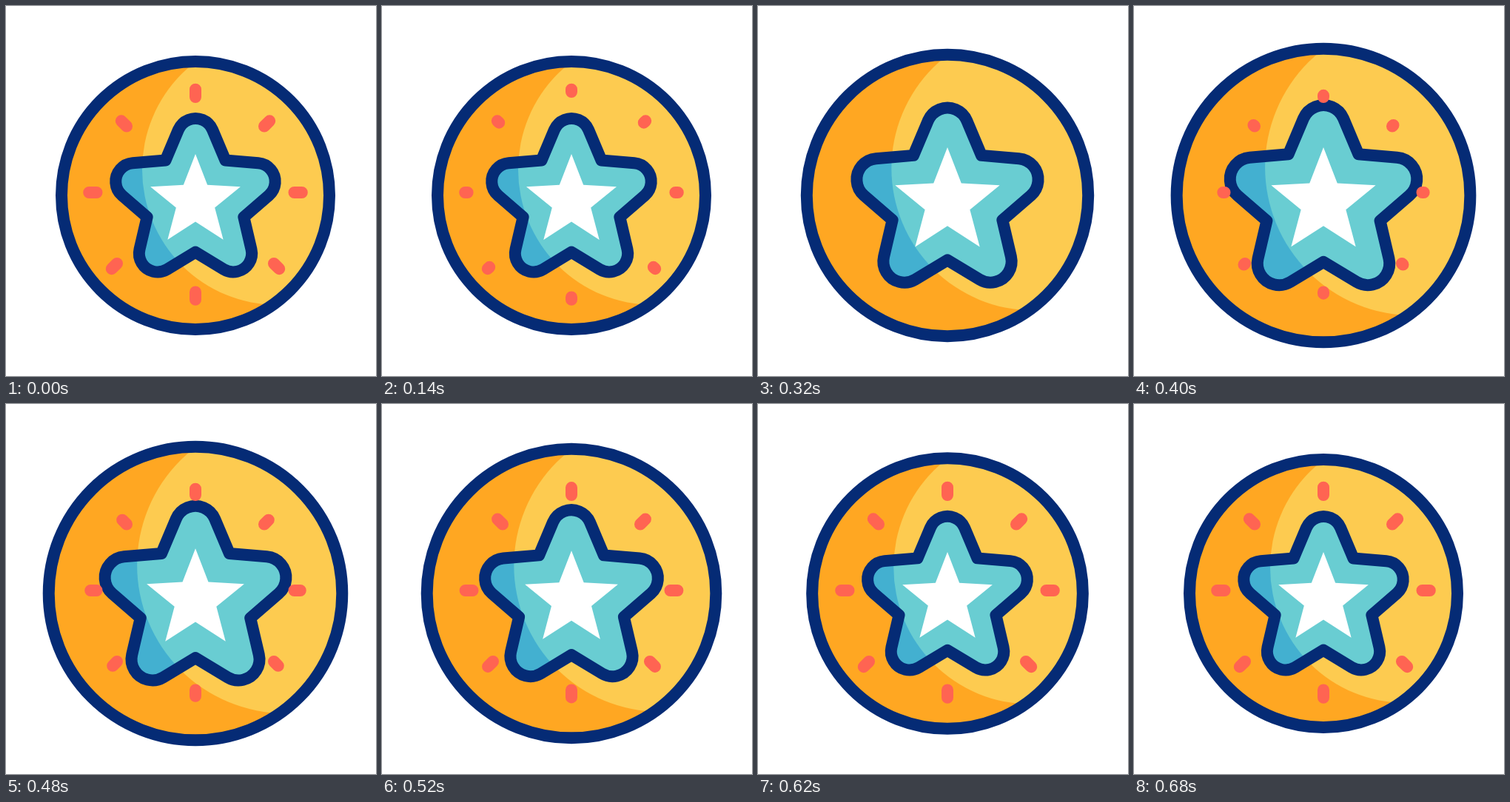
These frames come from a looping animation (500 px wide and 500 px high, 0.72 s). An HTML page with a canvas:

```html
<!DOCTYPE html>
<html lang="en">
<head>
<meta charset="utf-8">
<title>Star badge</title>
<style>
html, body { margin: 0; width: 100%; height: 100%; overflow: hidden; background: #fff; }
canvas { display: block; }
</style>
</head>
<body>
<canvas id="stage" width="500" height="500"></canvas>
<script>
const ctx = document.getElementById('stage').getContext('2d');
const LOOP = 720, HALF = 240, MID = 256, STAR_Y = 8;
const NAVY = '#052b75', ORANGE = '#ffa722', YELLOW = '#fdcb50';
const BLUE = '#43b0d0', TEAL = '#69cdd2', CORAL = '#ff6452';
const rad = deg => deg * Math.PI / 180;

// Inner end of each ray and its outward direction.
const rays = [
  [0, -133, 0, -1], [0, 130.5, 0, 1], [-133.5, -4, -1, 0], [133.5, -4, 1, 0],
  [-93, -93.5, -.7, -.7], [93, -93.5, .7, -.7], [-106, 92, -.7, .7], [106, 92, .7, .7]
];
const RAY_LENGTH = 10.3;

// Ease in-out, cubic-bezier(.5, 0, .5, 1).
function ease(x) {
  if (x <= 0) return 0;
  if (x >= 1) return 1;
  let lo = 0, hi = 1, s;
  for (let i = 0; i < 24; i++) {
    s = (lo + hi) / 2;
    if (1.5 * s * (1 - s) + s ** 3 < x) lo = s; else hi = s;
  }
  return s * s * (3 - 2 * s);
}
const ramp = (t, start) => ease((t - start) / HALF);
const pulse = (t, start, amount) =>
  1 + amount * (ramp(t, start) - ramp(t, start + HALF));

function disc(x, y, r) {
  const path = new Path2D();
  path.arc(x, y, r, 0, 2 * Math.PI);
  return path;
}

// Five-pointed star; cap is the radius of the rounded tips.
function star(tip, valley, cap, scale) {
  const path = new Path2D();
  for (let i = 0; i < 5; i++) {
    const a = rad(72 * i - 90), b = a + rad(36);
    path.arc(scale * tip * Math.cos(a), scale * (STAR_Y + tip * Math.sin(a)),
      scale * cap, a - rad(67), a + rad(67));
    path.lineTo(scale * valley * Math.cos(b), scale * (STAR_Y + valley * Math.sin(b)));
  }
  path.closePath();
  return path;
}

function fill(path, color) {
  ctx.fillStyle = color;
  ctx.fill(path);
}

function outlined(path, dark, light, shine) {
  fill(path, dark);
  ctx.save();
  ctx.clip(path);
  fill(shine, light);
  ctx.restore();
  ctx.strokeStyle = NAVY;
  ctx.stroke(path);
}

function drawRays(t) {
  const from = t < HALF ? ramp(t, 0) : 0;
  const to = t < HALF ? 1 : ramp(t, 320);
  if (to - from < 1e-3) return;
  ctx.strokeStyle = CORAL;
  ctx.beginPath();
  for (const [x, y, dx, dy] of rays) {
    const a = from * RAY_LENGTH, b = to * RAY_LENGTH;
    ctx.moveTo(x + dx * a, y + dy * a);
    ctx.lineTo(x + dx * b, y + dy * b);
  }
  ctx.stroke();
}

function draw(t) {
  const coin = pulse(t, 200, .1);
  const shine = disc(111 * coin, -35 * coin, 183 * coin);
  ctx.setTransform(1, 0, 0, 1, 0, 0);
  ctx.fillStyle = '#fff';
  ctx.fillRect(0, 0, 500, 500);
  ctx.translate(MID, MID);
  ctx.lineWidth = 16;
  ctx.lineCap = ctx.lineJoin = 'round';
  outlined(disc(0, 0, 181 * coin), ORANGE, YELLOW, shine);
  outlined(star(87, 68.7, 25, pulse(t, 160, .172)), BLUE, TEAL, shine);
  fill(star(64, 27.5, 0, pulse(t, 120, .168)), '#fff');
  drawRays(t);
}

const begin = performance.now();
function frame() {
  draw((performance.now() - begin) % LOOP);
  requestAnimationFrame(frame);
}
frame();
</script>
</body>
</html>
```
